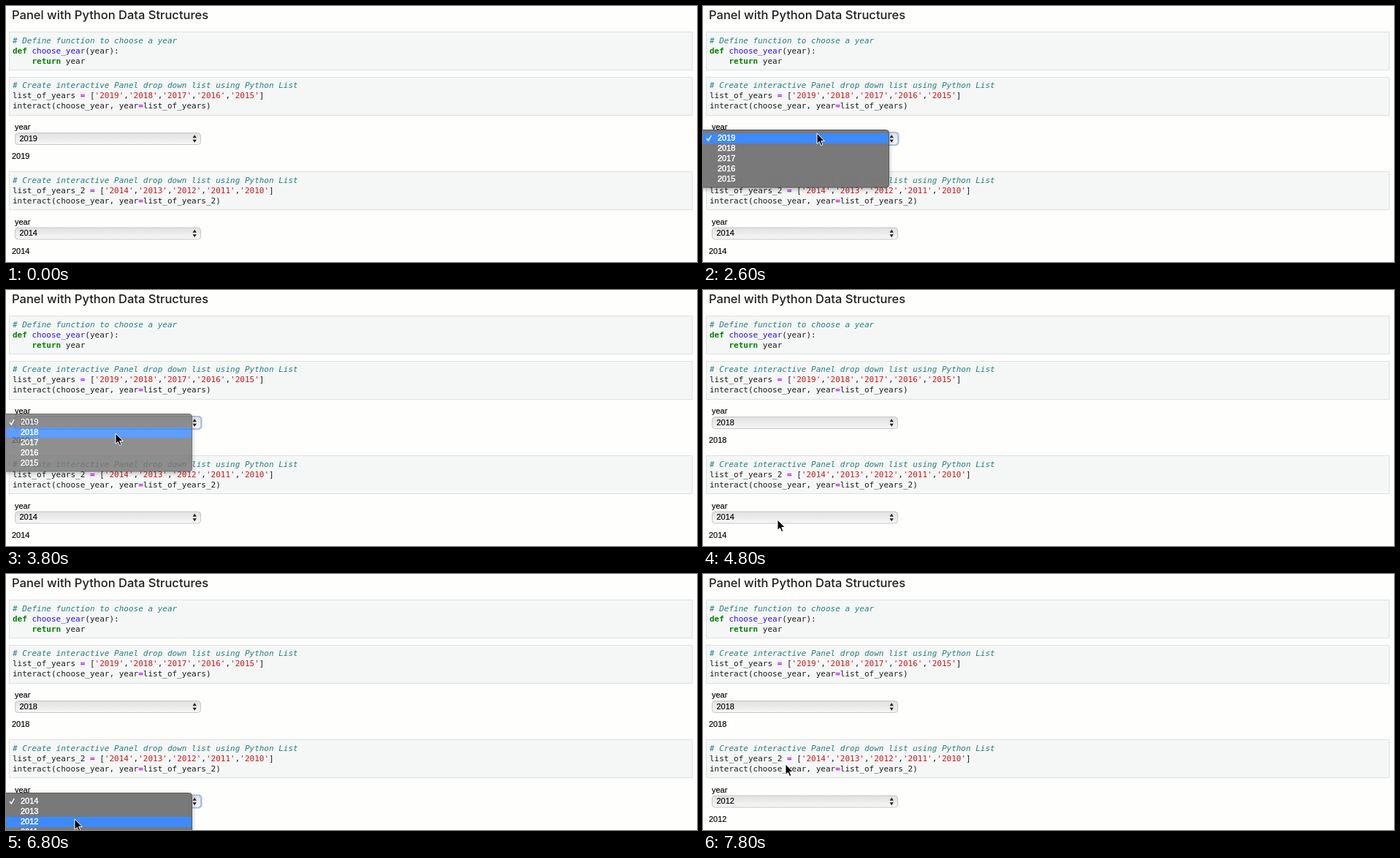
Animation of 946x350 px, one loop 8000 ms. Source, as an HTML page:

```html
<!DOCTYPE html>
<html lang="en">
<head>
<meta charset="utf-8">
<title>Panel with Python Data Structures</title>
<style>
  html, body { margin: 0; width: 100%; height: 100%; overflow: hidden; background: #fefefd; }
  svg { display: block; width: 946px; height: 350px; }
  text { white-space: pre; fill: #000; }
  .heading { font: 500 16.5px Inter, sans-serif; fill: #1f1f1f; }
  .code { font: 11px "DejaVu Sans Mono", monospace; fill: #1c1c1c; }
  .label { font: 11px "Liberation Sans", sans-serif; stroke: #000; stroke-width: .15px; }
  .item { font: 11px "Liberation Sans", sans-serif; fill: #fff; stroke: #fff; stroke-width: .45px; }
  .cell { fill: #f5f6f6; stroke: #dfe1e0; }
  .comment { fill: #24807f; font-style: italic; }
  .keyword { fill: #008200; font-weight: bold; }
  .def { fill: #2c14dc; }
  .op { fill: #b31be8; font-weight: bold; }
  .str { fill: #c41a1a; }
  .menu { filter: drop-shadow(0 2px 3px rgba(0, 0, 0, .3)); }
</style>
</head>
<body>
<svg viewBox="0 0 946 350">
  <defs>
    <linearGradient id="button" x2="0" y2="1">
      <stop stop-color="#e0e0e0"/><stop offset="1" stop-color="#f7f7f7"/>
    </linearGradient>
  </defs>
  <text class="heading" x="8" y="18">Panel with Python Data Structures</text>
  <g id="page"></g>
  <g id="menus"></g>
  <path id="cursor" d="M0 0V14.4L3.3 11.4L5.6 16.6L7.9 15.6L5.7 10.5H10.2Z" fill="#000" stroke="#fff" stroke-width="1"/>
</svg>
<script>
const LOOP = 8000, STEP = 200;
const $ = id => document.getElementById(id);
const span = (kind, s) => `<tspan class="${kind}">${s}</tspan>`;
const text = (kind, x, y, s, id = '') => `<text class="${kind}" x="${x}" y="${y}" id="${id}">${s}</text>`;
const cell = (y, lines) => `<rect class="cell" x="4.5" y="${y + .5}" width="935" height="52"/>` +
  lines.map((line, i) => text('code', 9, y + 15 + i * 14, line)).join('');

const lists = [
  { id: 'a', name: 'list_of_years', first: 2019, cellY: 97, textY: 112, boxY: 173, menuY: 169,
    pick: 1, open: 2600, fade: 3800, close: 4000 },
  { id: 'b', name: 'list_of_years_2', first: 2014, cellY: 226, textY: 242, boxY: 302.5, menuY: 299,
    pick: 2, open: 5400, fade: 7000, close: 7200 }
];
for (const l of lists) l.years = Array.from({ length: 5 }, (_, i) => l.first - i);

function listCell(l) {
  const strings = l.years.map(y => span('str', `'${y}'`)).join(',');
  const lines = [
    span('comment', '# Create interactive Panel drop down list using Python List'),
    `${l.name} ${span('op', '=')} [${strings}]`,
    `interact(choose_year, year${span('op', '=')}${l.name})`
  ];
  return `<rect class="cell" x="4.5" y="${l.cellY + .5}" width="935" height="52"/>` +
    lines.map((line, i) => text('code', 9, l.textY + i * 14, line)).join('');
}

function select(l) {
  const mid = l.boxY + 8.5;
  return text('label', 12, l.menuY, 'year') +
    `<rect id="ring-${l.id}" x="11.5" y="${l.boxY}" width="256" height="17" rx="4" fill="none" stroke="#8fbcf0" stroke-width="2"/>
     <rect x="12.5" y="${l.boxY + .5}" width="254" height="16" rx="4" fill="url(#button)" stroke="#c6c6c6"/>
     <path d="M255.5 ${mid - 1.3}h5.4l-2.7 -4zm0 2.6h5.4l-2.7 4z" fill="#222"/>` +
    text('label', 18.5, Math.floor(l.boxY) + 12, '', 'value-' + l.id) +
    text('label', 8, l.menuY + 40, '', 'output-' + l.id);
}

function menu(l) {
  const y = l.menuY;
  return `<g id="menu-${l.id}" class="menu">
    <rect x="-10" y="${y + .5}" width="264.5" height="78.5" rx="4" fill="#777" stroke="#555"/>
    <rect id="mark-${l.id}" x="-1" y="${y + 5}" width="255" height="14" fill="#3a89fb"/>
    <path d="M5 ${y + 12}l2.3 3l4 -7" fill="none" stroke="#fff" stroke-width="1.5"/>` +
    l.years.map((year, i) => text('item', 20, y + 15 + i * 14, year)).join('') + '</g>';
}

$('page').innerHTML = cell(36 - 1, []) +
  text('code', 9, 51, span('comment', '# Define function to choose a year')) +
  text('code', 9, 65, `${span('keyword', 'def')} ${span('def', 'choose_year')}(year):`) +
  text('code', 9, 79, `    ${span('keyword', 'return')} year`) +
  lists.map(l => listCell(l) + select(l)).join('');
$('menus').innerHTML = lists.map(menu).join('');

// Pointer stops: time, x, y
const path = [
  [1200, 150, 192], [1800, 156, 173], [2600, 156, 174], [2800, 156, 174], [3400, 150, 196],
  [4000, 150, 196], [4800, 102, 314], [5600, 102, 314], [6400, 94, 335], [7200, 94, 335], [7800, 113, 260]
];

function pointer(t) {
  const i = path.findIndex(p => p[0] >= t);
  if (i < 1) return path[0].slice(1);
  const [t0, x0, y0] = path[i - 1], [t1, x1, y1] = path[i];
  const k = (t - t0) / (t1 - t0), e = k * k * (3 - 2 * k);
  return [x0 + (x1 - x0) * e, y0 + (y1 - y0) * e];
}

const show = (el, on) => el.setAttribute('visibility', on ? 'visible' : 'hidden');

function draw(t) {
  const [x, y] = pointer(t);
  show($('cursor'), t >= path[0][0]);
  $('cursor').setAttribute('transform', `translate(${x} ${y})`);
  for (const l of lists) {
    const open = t >= l.open && t < l.close;
    const row = Math.max(0, Math.min(l.pick, Math.floor((y - l.menuY - 5) / 14)));
    const value = l.years[t >= l.close ? l.pick : 0];
    show($('menu-' + l.id), open);
    show($('ring-' + l.id), open);
    $('menu-' + l.id).setAttribute('opacity', t >= l.fade ? .82 : .98);
    $('mark-' + l.id).setAttribute('y', l.menuY + 5 + row * 14);
    $('value-' + l.id).textContent = value;
    $('output-' + l.id).textContent = value;
  }
}

function tick() {
  draw(Math.floor(performance.now() % LOOP / STEP) * STEP);
  requestAnimationFrame(tick);
}
tick();
</script>
</body>
</html>
```
